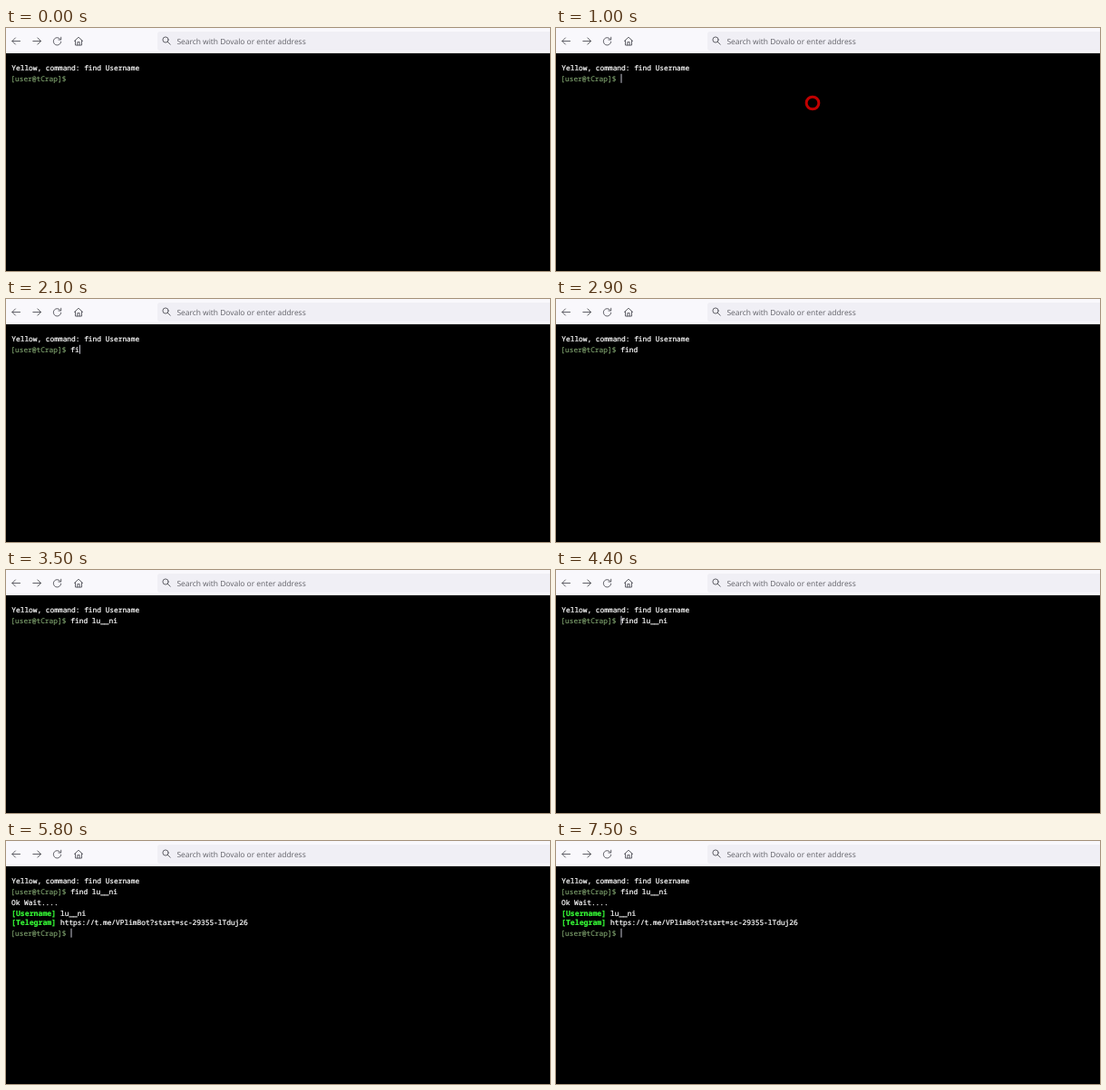
An HTML page for the animation above (8000 ms loop, 600 by 269 pixels).

```html
<!DOCTYPE html>
<html lang="en">
<head>
<meta charset="utf-8">
<title>Terminal</title>
<style>
  html, body { margin: 0; width: 100%; height: 100%; overflow: hidden; background: #000; }
  svg { display: block; width: 600px; height: 269px; }
  text { white-space: pre; text-rendering: geometricPrecision; font: 7.83px "Noto Sans Mono", monospace; fill: #fff; stroke: #fff; stroke-width: .22; }
  .prompt { fill: #83a872; stroke: #83a872; stroke-width: .12; }
  .key { font-size: 8.2px; font-weight: 700; fill: #35f535; stroke: #35f535; }
  .hint { font: 8.45px "Open Sans", sans-serif; fill: #606067; stroke: none; }
  .icon { fill: none; stroke: #5a5a61; stroke-width: .95; stroke-linecap: round; stroke-linejoin: round; }
</style>
</head>
<body>
<svg viewBox="0 0 600 269">
  <rect width="600" height="269"/>
  <rect width="600" height="28" fill="#f9f8fc"/>
  <path d="M170 4H600V25H170Q167 25 167 22V7Q167 4 170 4Z" fill="#f0eff5"/>
  <g class="icon">
    <path d="M15.5 14.5H6.8M10.4 10.9L6.8 14.5L10.4 18.1"/>
    <path d="M29.8 14.5H38.5M34.9 10.9L38.5 14.5L34.9 18.1"/>
    <path d="M60.1 12.6A4.2 4.2 0 1 0 60.7 15.2M60.7 10.2V13H57.9"/>
    <path d="M75.4 14.4L80 10.2L84.6 14.4M76.5 13.6V19H83.5V13.6M78.8 19V15.6H81.2V19"/>
    <circle cx="176" cy="13" r="3.1"/>
    <path d="M178.3 15.3L181.2 18.2"/>
  </g>
  <text class="hint" x="188.4" y="17.6">Search with Dovalo or enter address</text>

  <text x="6.3" y="46.8">Yellow, command: find Username</text>
  <text class="prompt" x="5.3" y="58.8">[user@tCrap]$</text>
  <text id="typed" x="71.3" y="58.8"></text>
  <text id="wait" x="6" y="71">Ok Wait....</text>
  <text id="next" class="prompt" x="5.3" y="83">[user@tCrap]$</text>
  <g id="result">
    <text class="key" x="6" y="82.8">[Username]</text>
    <text x="60" y="82.8">lu__ni</text>
    <text class="key" x="6" y="92.8">[Telegram]</text>
    <text x="60" y="92.8">https://t.me/VPlimBot?start=sc-29355-lTduj26</text>
  </g>
  <circle id="ring" cx="283" cy="83" fill="none" stroke="#f00000" stroke-width="3"/>
  <rect id="caret" width="1" height="10" fill="#c4c4d0"/>
</svg>
<script>
const LOOP = 8000, CHAR = 4.698, LEFT = 71.5;
const command = "find lu__ni";
const [typed, wait, next, result, ring, caret] =
  ["typed", "wait", "next", "result", "ring", "caret"].map(id => document.getElementById(id));

// [time, characters typed]
const typing = [[0, 0], [2100, 2], [2300, 3], [2400, 4], [2500, 5], [3200, 11]];
// [caret on, caret off]
const blinks = [[1000, 1900], [2100, 2900], [3200, 3500], [3700, 4200],
                [4400, 5300], [5500, 6300], [6500, 7400], [7500, LOOP]];

const show = (el, on) => el.setAttribute("visibility", on ? "visible" : "hidden");
const set = (el, attrs) => { for (const k in attrs) el.setAttribute(k, attrs[k]); };

function draw(t) {
  const count = typing.filter(step => step[0] <= t).pop()[1];
  const sent = t >= 4500, found = t >= 5800;

  typed.textContent = command.slice(0, count);
  show(wait, sent);
  show(next, sent);
  show(result, found);
  next.setAttribute("y", found ? 105 : 83);

  const column = t < 3700 ? count : 0;
  set(caret, { x: LEFT + column * CHAR, y: found ? 96.8 : sent ? 75 : 50.8 });
  show(caret, blinks.some(([on, off]) => t >= on && t < off));

  // the click ring grows and fades in tenths of a second
  const k = (Math.floor(t / 100) * 100 - 900) / 500;
  const clicked = k >= 0 && k < 1;
  show(ring, clicked);
  if (clicked) set(ring, { r: 4 + 14.3 * k, opacity: 1 - k });
}

const start = performance.now();
function tick() {
  draw((performance.now() - start) % LOOP);
  requestAnimationFrame(tick);
}
tick();
</script>
</body>
</html>
```
